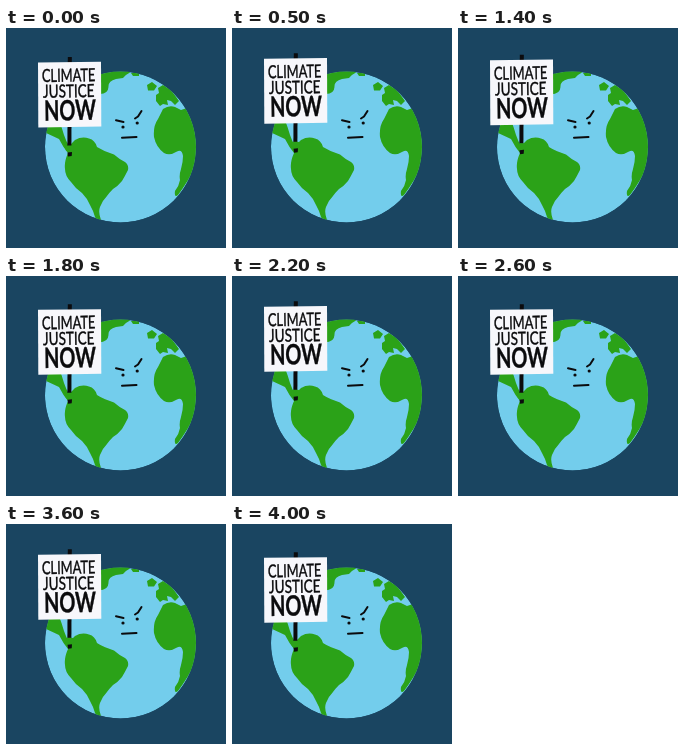
Recreate the animation shown at these times as an HTML page. Size 220 by 220 pixels, loop 4100 ms.

```html
<!DOCTYPE html>
<html lang="en">
<head>
<meta charset="utf-8">
<title>Earth with a protest sign</title>
<style>
  html, body { margin: 0; width: 100%; height: 100%; overflow: hidden; background: #1a4561; }
  svg { display: block; width: 100%; height: 100%; }
  .land { fill: #2ba218; }
  .ink { fill: none; stroke: #0b0b0d; stroke-width: 2; stroke-linecap: round; stroke-linejoin: round; }
  text {
    font: 18px Lato, sans-serif; text-anchor: middle;
    fill: #0b0b0d; stroke: #0b0b0d; stroke-width: .4; stroke-linejoin: round;
  }
  .loud { font-size: 28px; font-weight: 700; }
</style>
</head>
<body>
<svg viewBox="0 0 220 220">
  <clipPath id="globe"><circle cx="114.5" cy="119" r="75.5"/></clipPath>
  <g clip-path="url(#globe)">
    <circle cx="114.5" cy="119" r="75.5" fill="#73cdec"/>
    <g class="land">
      <!-- the Americas -->
      <path d="M38 90 L53 92 Q56 100 58 107 Q60 113 63 118 L69 112 Q76 108 83 110.5
               Q89 112 91 119 Q99 124 108 126.5 Q113 131 119 134 Q123 137 122 142
               Q119 148 116 153 Q112 158 107 161 Q103 165 101 168 Q96 173 94 179
               Q92 184 95 192 Q91 193 89 189 Q87 182 84 177 Q81 170 76 165
               Q69 160 65 154 Q59 148 59 141 Q58 134 62 125
               Q57 119 53 111 L38 104Z"/>
      <path d="M94 50 L96 43 L122 41 L124 44.5 Q119 47 117 50 L110 51 Q102 53 102.5 59 Q102 66 94 66Z"/>
      <!-- Europe -->
      <path d="M125 45 L133 45 L133 48 L127 48Z M141 57 L146 54 L151 58 L148 62.5 L142 62.5Z"/>
      <path d="M150 67 L153 65 L152 60 L157 57 L165 62 L173 73 L169 77 L165 73 L161 72
               L162 77 L157 76 L154 78 L150 73Z"/>
      <!-- Africa -->
      <path d="M157 81 Q163 77 169 79 L175 82 L181 80 L194 90 L194 128 Q185 150 172 167
               Q168 170 169 163 Q173 158 174 152 Q173 147 175 141 Q177 134 177 128
               Q176 121 171 123.5 Q164 128 158 125 Q150 119 148 109 Q147 98 152 91Z"/>
    </g>
  </g>
  <path class="ink" d="M110 92.3 L117.5 94 M129 90.5 L132 88.5 L135.5 83 M116 109.7 L130.5 109"/>
  <g fill="#0b0b0d">
    <circle cx="117" cy="99" r="1.6"/>
    <circle cx="131.2" cy="95" r="1.6"/>
  </g>
  <g id="sign">
    <path class="ink" style="stroke-width:4;stroke-linecap:butt" d="M63.8 29 L63.4 118"/>
    <rect class="land" x="59.5" y="117.5" width="8.5" height="6" rx="2.5"/>
    <path d="M61.5 124.5 L66 124 L65.7 128 L62 128.5Z" fill="#0b0b0d"/>
    <path d="M32 34.5 L95 33.8 L95.3 98.5 L32.3 99.5Z" fill="#f7f7fb"/>
    <g transform="rotate(-1 64 66)">
      <text transform="translate(63 53.6) scale(.715 1)">CLIMATE</text>
      <text transform="translate(62.7 69.4) scale(.75 1)">JUSTICE</text>
      <text class="loud" transform="translate(63.8 92.2) scale(.71 1)">NOW</text>
    </g>
  </g>
</svg>
<script>
  const LOOP = 4100, STEP = 100, POSES = 8, HEIGHT = 4.5;
  const sign = document.getElementById("sign");

  // The sign pumps in eight held poses; one pose is held twice at 1.4 s.
  function draw(now) {
    const tick = Math.floor((now % LOOP) / STEP);
    const pose = (tick < 15 ? tick : tick - 1) % POSES;
    const lift = HEIGHT * (1 - Math.cos(2 * Math.PI * pose / POSES)) / 2;
    sign.setAttribute("transform", `translate(0 ${-lift})`);
  }

  const start = performance.now();
  function loop() {
    draw(performance.now() - start);
    requestAnimationFrame(loop);
  }
  loop();
</script>
</body>
</html>
```
